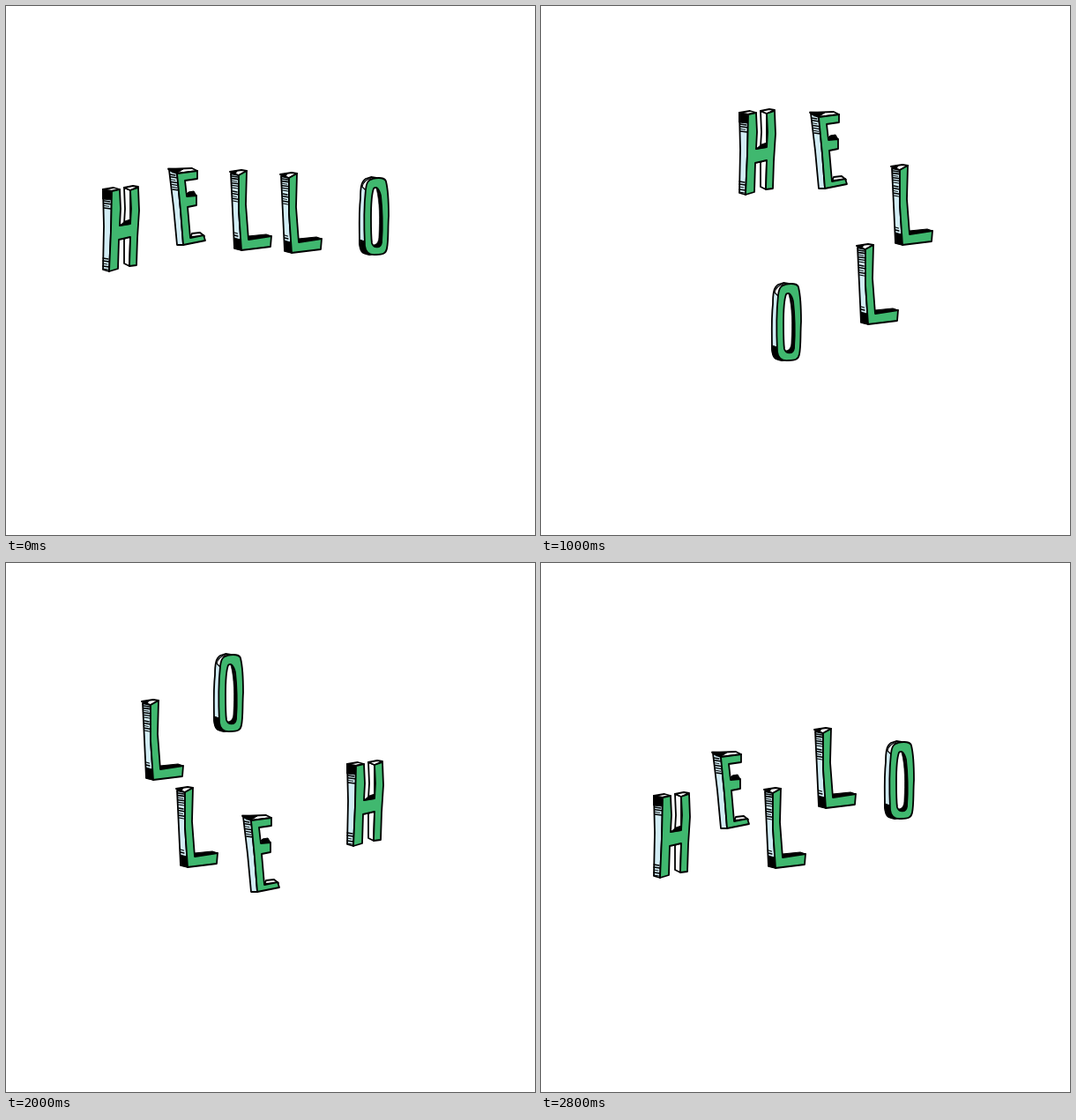
An HTML page with a canvas for the animation above (3 s loop, 600 px wide and 600 px high).

```html
<!DOCTYPE html>
<html lang="en">
<head>
<meta charset="utf-8">
<title>Hello</title>
<style>
html, body { margin: 0; width: 100%; height: 100%; overflow: hidden; background: #fff; }
canvas { display: block; width: 100vw; height: 100vh; }
</style>
</head>
<body>
<canvas id="stage" width="600" height="600"></canvas>
<script>
const ctx = document.getElementById('stage').getContext('2d');
const GREEN = '#40b86f', BLUE = '#d2edf5', INK = '#000', WHITE = '#fff';
const STEP = 200, COUNT = 15;

function shape(d, fill, width = 1.8) {
  const p = new Path2D(d);
  ctx.fillStyle = fill;
  ctx.fill(p);
  ctx.lineWidth = width;
  ctx.stroke(p);
}

// Uneven pen strokes from (x, y) down to yEnd, drifting sideways by lean.
function hatch(x, y, yEnd, len, lean = 0) {
  const n = Math.round((yEnd - y) / 2.7);
  for (let i = 0; i <= n; i++) {
    const wobble = Math.sin(i * 2.4);
    const px = x + lean * i / n, py = y + (yEnd - y) * i / n;
    ctx.lineWidth = 1.3 + 0.4 * wobble;
    ctx.beginPath();
    ctx.moveTo(px, py);
    ctx.lineTo(px + len * (0.85 + 0.15 * wobble), py + 1);
    ctx.stroke();
  }
}

// All letters are drawn at their resting place.
function drawH() {
  shape('M110 208L120 210L119 255L117 301L110 299L111 250Z', BLUE);
  shape('M110 208L120 210L120 220L110 219Z', INK, 1);
  hatch(111, 221, 229, 8);
  hatch(110, 286, 298, 7);
  shape('M110 208L122 206L129 208L120 210Z', WHITE);
  shape('M134 206L141 209L141 249L134 247L135 230Z', WHITE);
  shape('M134 264L141 261L140 295L134 292Z', WHITE);
  shape('M134 206L144 204L150 205L141 209Z', WHITE);
  shape('M120 210L129 208L130 230L129 249L141 247L142 230L141 209L150 206' +
    'L151 232L149 263L148 294L140 295L141 262L128 265L127 298L117 301L119 255Z', GREEN);
  shape('M129 249L135 244L141 242L141 247Z', INK, 0.8);
}

function drawE() {
  shape('M185 186L194 190L198 232L201 271L194 271L190 228Z', BLUE);
  hatch(186, 191, 208, 7, 3);
  shape('M184 185L211 184L217 187L194 190Z', WHITE);
  shape('M184 184L201 185L195 189L189 189Z', INK, 0.8);
  shape('M205 213L207 211L213 210L216 215L206 217Z', INK, 1);
  shape('M209 262L211 258L220 257L225 261Z', WHITE);
  shape('M194 190L217 187L217 196L203 198L205 216L216 215L216 226L206 228' +
    'L209 263L224 260L226 266L201 271L198 232Z', GREEN);
}

function drawL() {
  shape('M255 190L264 192L264 232L267 277L259 275L257 232Z', BLUE);
  hatch(256, 193, 206, 8, 0.6);
  hatch(257, 210, 221, 6, 0.5);
  hatch(259, 257, 260, 4);
  shape('M259 263L266 265L267 277L259 275Z', INK, 0.8);
  shape('M254 188L267 186L273 187L264 192Z', WHITE);
  shape('M254 188L262 187L260 191Z', INK, 0.8);
  shape('M275 265L275 261L295 259L301 261Z', INK, 1.2);
  shape('M264 192L273 187L272 225L275 265L301 261L300 273L267 277L264 232Z', GREEN);
}

function drawL2() {
  ctx.translate(57, 3);
  drawL();
}

function drawO() {
  shape('M408 196C403 199 402 206 402 218C400 235 401 255 401 270C402 279 404 281 412 282' +
    'L420 281L420 195L414 194Z', BLUE);
  shape('M404 205C405 200 408 197 414 195L424 195L413 199L408 209Z', WHITE, 1.2);
  shape('M401 265L407 267L409 277L414 282C405 281 402 279 401 270Z', INK, 1);
  shape('M416 196C423 194 430 195 431 199C434 211 434 222 434 238C433 254 434 265 432 275' +
    'C431 281 427 282 420 282C412 283 408 280 407 272C406 251 406 226 408 208C409 200 411 197 416 196Z', GREEN);
  shape('M417 207C414 215 414 228 414 240C414 252 414 262 415 269C417 275 425 275 426 268' +
    'C427 252 427 232 425 215C423 207 420 204 417 207Z', WHITE);
  shape('M420 207C424 208 425 218 426 230C427 246 427 260 426 268C425 274 418 275 416 271' +
    'C421 271 423 267 423 260C424 242 424 222 420 207Z', INK, 0.6);
}

// Waypoints as x, y offsets from the resting place, passed at these steps.
const KEYS = [0, 3, 4, 6, 8, 10, 12, 14];
const letters = [
  [drawH, [0, 0, 27, -57, 79, -72, 146, -95, 221, -77, 277, 20, 150, 52, 18, 56]],
  [drawE, [0, 0, 47, -83, 85, -66, 150, -54, 181, 53, 84, 102, -30, 51, 10, 30]],
  [drawL, [0, 0, 73, -79, 112, -58, 145, 50, 13, 95, -61, 68, -86, -61, -1, 69]],
  [drawL2, [0, 0, 100, -6, 98, 40, -21, 104, -121, 67, -157, -34, -46, -90, -1, -2]],
  [drawO, [0, 0, -15, 135, -70, 127, -203, 102, -271, 0, -165, -91, -46, -69, -11, 8]]
];

// Closed smooth curve through the waypoints; axis 0 is x, 1 is y.
function along(path, axis, step) {
  const n = KEYS.length;
  const time = i => KEYS[(i + n) % n] + COUNT * Math.floor(i / n);
  const value = i => path[2 * ((i + n) % n) + axis];
  const speed = i => (value(i + 1) - value(i)) / (time(i + 1) - time(i));
  const tangent = i => {
    const before = time(i) - time(i - 1), after = time(i + 1) - time(i);
    return (speed(i - 1) * after + speed(i) * before) / (before + after);
  };
  const k = KEYS.filter(t => t <= step).length - 1;
  const span = time(k + 1) - time(k), u = (step - time(k)) / span, v = 1 - u;
  return Math.round(value(k) * v * v * (1 + 2 * u) + value(k + 1) * u * u * (1 + 2 * v) +
    span * u * v * (tangent(k) * v - tangent(k + 1) * u));
}

function frame(ms) {
  const step = Math.floor(ms / STEP) % COUNT;
  ctx.fillStyle = WHITE;
  ctx.fillRect(0, 0, 600, 600);
  ctx.strokeStyle = INK;
  ctx.lineJoin = ctx.lineCap = 'round';
  for (const [draw, path] of letters) {
    ctx.save();
    ctx.translate(along(path, 0, step), along(path, 1, step));
    draw();
    ctx.restore();
  }
}

const start = performance.now();
function tick() {
  frame(performance.now() - start);
  requestAnimationFrame(tick);
}
tick();
</script>
</body>
</html>
```
